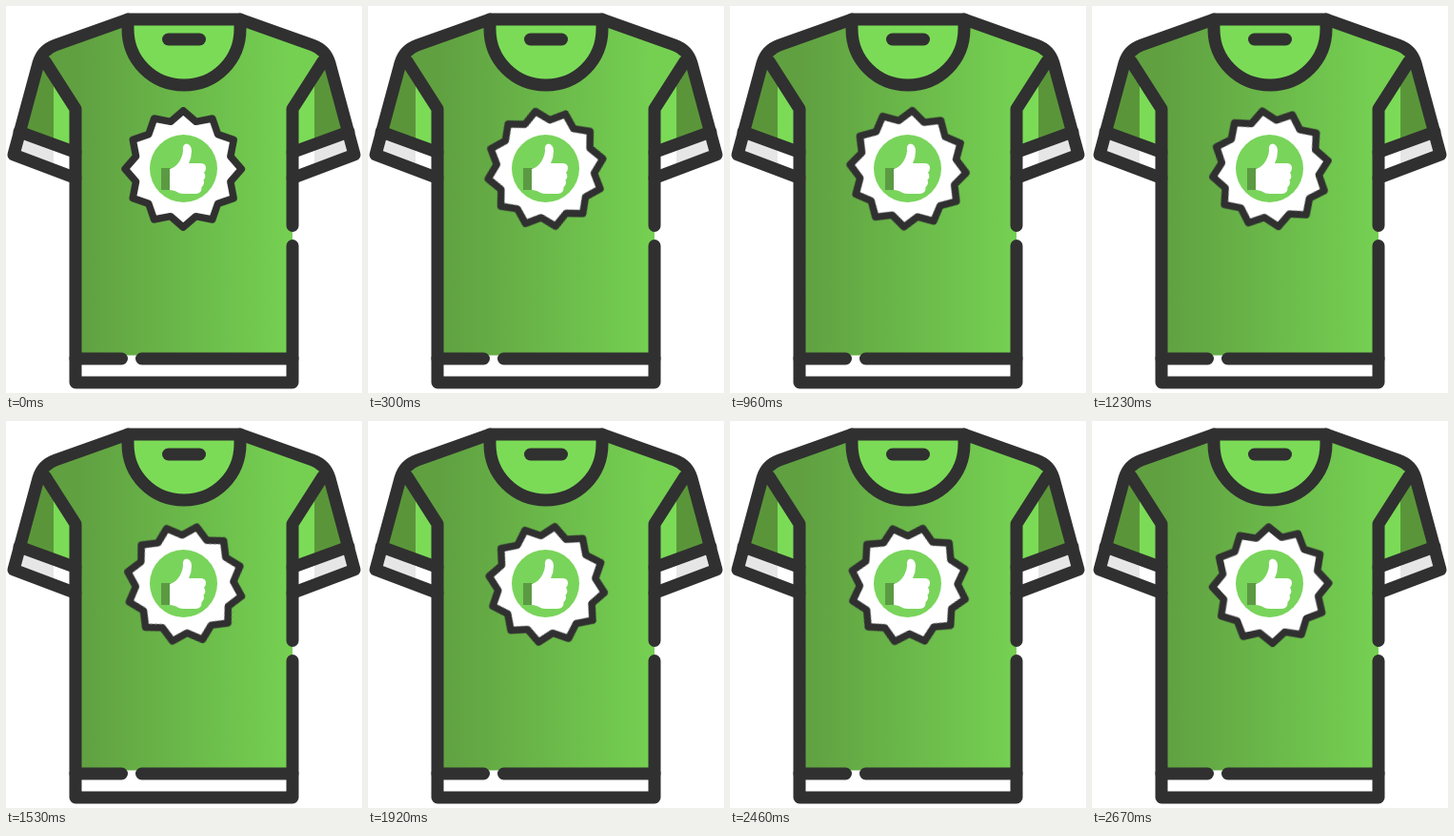
An HTML page for the animation above (2700 ms loop, 374 px wide and 406 px high).

```html
<!DOCTYPE html>
<html lang="en">
<head>
<meta charset="utf-8">
<title>Shirt with badge</title>
<style>
  html, body { margin: 0; width: 100%; height: 100%; overflow: hidden; background: #fff; }
  svg { display: block; width: 374px; height: 406px; }
  .line { fill: none; stroke: #303030; stroke-width: 13; stroke-linecap: round; stroke-linejoin: round; }
  .light { fill: #7bdb57; }
  .dark { fill: #5a9639; }
  .shade { fill: #e6e6e6; }
  #badge { transform-origin: 186.9px 171.6px; }
  #star { fill: #fff; stroke: #303030; stroke-width: 7.5; stroke-linejoin: round; }
</style>
</head>
<body>
<svg viewBox="0 0 374 406">
  <defs>
    <linearGradient id="cloth" gradientUnits="userSpaceOnUse" x1="76" x2="298" y1="0" y2="0">
      <stop offset="0" stop-color="#60a041"/>
      <stop offset="1" stop-color="#75d052"/>
    </linearGradient>
    <g id="sleeve">
      <path class="light" d="M41 58L73 108V153.500L14 132L34 60Z"/>
      <path class="dark" d="M41 58L50 72V145L14 132L34 60Z"/>
      <path class="shade" d="M14 132L50 145V172L8 156Z"/>
    </g>
    <g id="seam" class="line">
      <path d="M128 14L52 41Q38 46 34 60L8 156L73 180.500"/>
      <path d="M14 132L73 153.500"/>
    </g>
  </defs>

  <use href="#sleeve"/>
  <use href="#sleeve" transform="matrix(-1 0 0 1 374 0)"/>
  <path fill="url(#cloth)" d="M128 14L52 41L41 58L73 108V366.500H301V108L333 58L322 41L246 14Z"/>
  <path class="light" d="M128 14V24C128 57 154 83 187 83S246 57 246 24V14Z"/>

  <use href="#seam"/>
  <use href="#seam" transform="matrix(-1 0 0 1 374 0)"/>
  <g class="line">
    <path d="M128 14V24C128 57 154 83 187 83S246 57 246 24V14Z"/>
    <path d="M170.500 35H203.500"/>
    <path d="M41 58L73 108V395H301V251.500"/>
    <path d="M333 58L301 108V230.500"/>
    <path d="M73 370H121.500M142.500 370H301"/>
  </g>

  <g id="badge"><path id="star"/></g>
  <circle cx="186.500" cy="170.500" r="35.500" fill="#79d45b"/>
  <path fill="#5b9a43" d="M163 170H173V193H163Z"/>
  <path fill="#fff" d="M172 171C178 170 185 162 186 152Q185 145 189.500 144.500Q195 145.500 195 152Q195 159 192 165H204Q210 165 210 170Q210 173 208 174.500Q211 180 207.500 182.500Q209 187 205.500 190Q206 197 199 197H187C180 197 179 193 172 193Z"/>
</svg>
<script>
  const LOOP = 2700, TIPS = 12, OUTER = 61.2, INNER = 51.4;
  const center = { x: 186.2, y: 171 };

  const points = Array.from({ length: TIPS * 2 }, (_, i) => {
    const r = i % 2 ? INNER : OUTER;
    const a = i * Math.PI / TIPS;
    return `${(center.x + r * Math.sin(a)).toFixed(2)} ${(center.y - r * Math.cos(a)).toFixed(2)}`;
  });
  document.getElementById('star').setAttribute('d', `M${points.join('L')}Z`);

  // The pivot sits slightly off the star's center, so the badge wobbles.
  document.getElementById('badge').animate(
    [{ transform: 'rotate(0deg)' }, { transform: 'rotate(180deg)' }],
    { duration: LOOP, iterations: Infinity, easing: 'linear' }
  );
</script>
</body>
</html>
```
